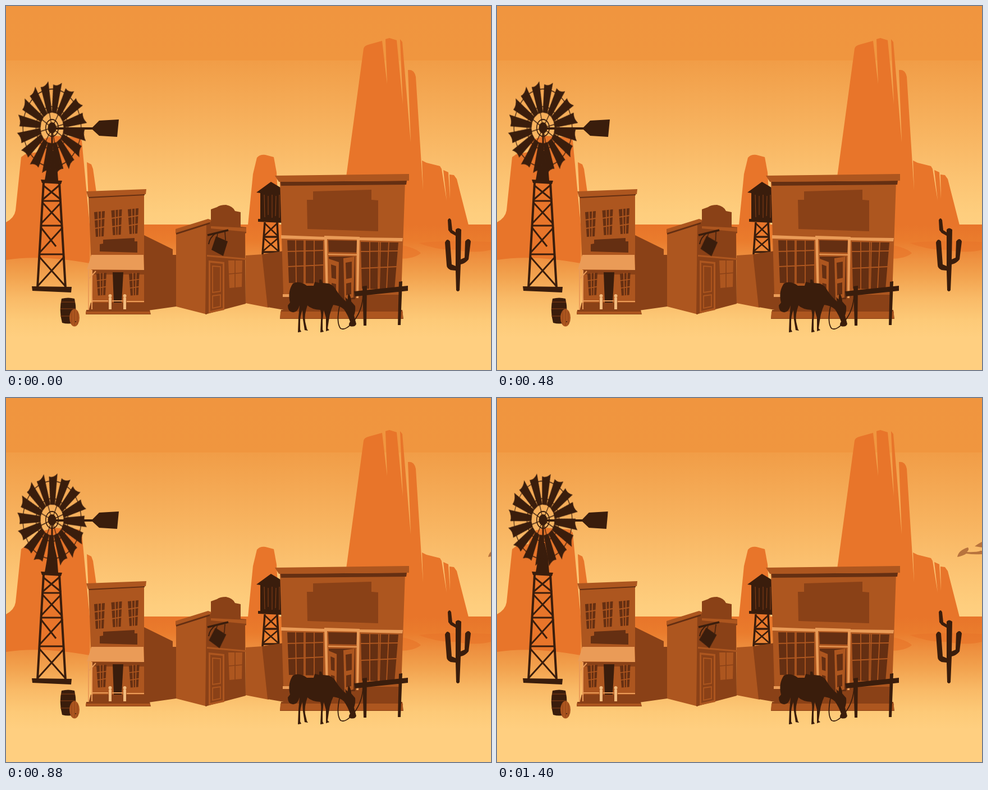
Recreate the animation shown at these times as an HTML page without scripts. Size 864 by 648 pixels, loop 1.44 s.

```html
<!DOCTYPE html>
<html lang="en">
<head>
<meta charset="utf-8">
<title>Frontier town</title>
<style>
html, body { margin: 0; width: 100%; height: 100%; overflow: hidden; background: #ffcf80; }
svg { display: block; width: 864px; height: 648px; }

.ink { fill: #3a1d0c; }
.brown { fill: #ad561f; }
.shade { fill: #8a4117; }
.deep { fill: #652f12; }
.mesa { fill: #e8752a; }
.trim { fill: #ea9b57; }
.line { fill: none; stroke: #3a1d0c; }
.bars { fill: none; stroke: #ad561f; stroke-width: 1.8; }
.rail { fill: none; stroke: #ea9b57; stroke-width: 2; }

.wheel, .vane, .sign, .bird, .door { animation: 1440ms linear infinite; }
.wheel { animation-name: spin; animation-timing-function: steps(36); }
.bird { animation-name: glide; animation-timing-function: steps(36); }
.vane { animation-name: turn; }
.sign { animation-name: swing; }
.door { animation-name: open; }

@keyframes spin { to { transform: rotate(135deg); } }
@keyframes glide { from { transform: translateX(105px); } to { transform: translateX(-3px); } }
@keyframes turn {
  0%, 62% { transform: scaleX(1); }
  72% { transform: scaleX(.996); }
  86% { transform: scaleX(.985); }
  100% { transform: scaleX(.97); }
}
@keyframes swing {
  0% { transform: rotate(0); }
  22% { transform: rotate(5deg); }
  44% { transform: rotate(8deg); }
  72% { transform: rotate(9.5deg); }
  100% { transform: rotate(12deg); }
}
@keyframes open {
  0% { transform: scaleX(1); }
  22% { transform: scaleX(.95); }
  61%, 100% { transform: scaleX(.8); }
}
</style>
</head>
<body>
<svg viewBox="0 0 864 648">
  <defs>
    <linearGradient id="sky" gradientUnits="userSpaceOnUse" x1="0" y1="0" x2="0" y2="390">
      <stop offset="0" stop-color="#f0953f"/>
      <stop offset=".25" stop-color="#f0963f"/>
      <stop offset=".25" stop-color="#f19d47"/>
      <stop offset=".55" stop-color="#f7b25e"/>
      <stop offset=".8" stop-color="#fcc473"/>
      <stop offset=".95" stop-color="#fece7e"/>
      <stop offset="1" stop-color="#fecf80"/>
    </linearGradient>
    <linearGradient id="ground" gradientUnits="userSpaceOnUse" x1="0" y1="390" x2="0" y2="590">
      <stop offset="0" stop-color="#e8752a"/>
      <stop offset=".14" stop-color="#ea7c2d"/>
      <stop offset=".3" stop-color="#ee9140"/>
      <stop offset=".45" stop-color="#f2a24e"/>
      <stop offset=".65" stop-color="#f9ba67"/>
      <stop offset=".85" stop-color="#fdca78"/>
      <stop offset="1" stop-color="#ffcf80"/>
    </linearGradient>

    <!-- Sixteen blades by repeated doubling -->
    <path id="blade" d="M-5-27L-10-77Q0-74 10-83L6-27Z"/>
    <g id="blades2"><use href="#blade"/><use href="#blade" transform="rotate(22.5)"/></g>
    <g id="blades4"><use href="#blades2"/><use href="#blades2" transform="rotate(45)"/></g>
    <g id="blades8"><use href="#blades4"/><use href="#blades4" transform="rotate(90)"/></g>

    <g id="pane">
      <path class="deep" d="M0 2L19 0L17 45L3 46Z"/>
      <path class="bars" d="M7 0L8 46M13 0L12 46M0 16L19 13M1 31L19 28"/>
    </g>
  </defs>

  <rect width="864" height="390" fill="url(#sky)"/>
  <rect y="389" width="864" height="259" fill="url(#ground)"/>

  <g class="mesa">
    <path d="M0 385Q15 377 17 364L27 269L34 264L56 260L62 238L85 231L130 234L135 240L149 388V458Q60 442 0 452Z"/>
    <path d="M144 278L152 282L155 290L161 332L163 390H149Z"/>
    <path d="M431 390L440 299L447 270Q452 264 462 265L477 269L482 296L487 390Z"/>
    <path d="M606 304L637 76Q638 71 645 69L670 62L679 139L676 59L683 57L696 61L707 175L702 59L706 64L721 243L716 114Q727 112 730 126L743 328L741 275L749 279L773 285L776 290L785 346L779 292L788 296L791 343L790 300L798 301L803 308L824 390H606Z"/>
    <path opacity=".7" d="M700 425Q730 430 739 440Q728 450 700 450ZM735 422Q790 416 864 420V434Q838 441 800 434Q765 434 735 422Z"/>
  </g>

  <!-- Bird -->
  <g class="bird" fill="#b8733d">
    <path d="M820 283Q822 271 839 266Q842 270 837 274Q851 275 864 272V278Q848 279 836 277Q830 281 820 283Z"/>
    <path d="M851 264Q859 258 872 252L964 240V266L864 266Z"/>
    <path d="M860 272L930 270L964 280L860 278Z"/>
  </g>

  <!-- Windmill -->
  <path class="ink" d="M62 309L100 311L98 317L64 315ZM46 499L117 500L116 510L47 507ZM69 310L74 281L80 258H85L91 285L93 311Z"/>
  <g class="line" stroke-width="4">
    <path d="M67 314L56 502M95 314L106 502"/>
    <path stroke-width="3" d="M65 347H98M62 391H101M59 442H104M66 319L98 345M95 319L65 345M65 350L100 388M98 350L62 388M62 394L89 428M101 394L59 440M59 446L105 498M104 446L57 498"/>
  </g>
  <g transform="translate(82 217)">
    <g class="vane ink">
      <path d="M0-1H72L84-13L119-15L116 16L84 14L72 3H0Z"/>
    </g>
    <g transform="scale(.75 1)">
      <g class="wheel">
        <g class="ink" transform="rotate(-13)">
          <use href="#blades8"/><use href="#blades8" transform="rotate(180)"/>
          <g class="line" stroke-width="1.6">
            <circle r="69"/><circle r="38"/>
            <path d="M0-38V38M-38 0H38M-27-27L27 27M27-27L-27 27"/>
          </g>
        </g>
      </g>
      <circle class="line" r="15" stroke-width="2"/>
      <circle class="ink" r="10"/>
    </g>
    <path class="line" stroke-width="3" d="M0 0V50"/>
  </g>

  <!-- Barrels -->
  <path class="ink" d="M99 521Q111 518 122 521Q127 542 122 564Q111 567 100 564Q94 543 99 521Z"/>
  <path class="line" style="stroke:#8a4117" d="M98 527H123M97 539H124M97 552H124"/>
  <ellipse class="brown" cx="122" cy="555" rx="9" ry="15.5"/>
  <path class="line" style="stroke:#8a4117" stroke-width=".8" d="M117 543V567M122 541V569M127 544V567"/>
  <circle class="ink" cx="124" cy="562" r="1"/>

  <!-- Tall house -->
  <path class="shade" d="M246 408L297 433V443H303V535L246 543Z"/>
  <path class="brown" d="M147 336L246 334V545H155Z"/>
  <path class="deep" d="M147 339L247 334V337L148 342Z"/>
  <path class="brown" d="M143 330L250 326L249 335L146 340Z"/>
  <use href="#pane" x="157" y="365"/>
  <use href="#pane" x="187.500" y="362"/>
  <use href="#pane" x="217" y="360"/>
  <path class="deep" d="M173 416L229 413V419H234V439L167 437V424L173 423Z"/>
  <path class="shade" d="M153 470H246V478H153ZM151 528H246V543H147Z"/>
  <use href="#pane" transform="translate(161 475) scale(.94 .88)"/>
  <use href="#pane" transform="translate(219 475) scale(.98 .88)"/>
  <path class="ink" d="M190 474H209L206 528H192Z"/>
  <path class="trim" d="M152 443H245L246 470L144 469Z"/>
  <path class="rail" d="M147 470V542M153 470V540M148 485L160 472M153 525H182M189 525H208M215 526H246"/>
  <path fill="#f3bb7d" d="M183 519H188V540H183ZM209 519H214V540H209Z"/>
  <g fill="#f3bb7d"><circle cx="185.500" cy="516" r="3"/><circle cx="211.500" cy="516" r="3"/></g>
  <path class="shade" d="M143 541H256L258 549H142Z"/>
  <path class="brown" d="M142 544H257V548H142Z"/>

  <!-- Water tower -->
  <path class="ink" d="M446 332L472 313L492 325V386L449 384V379H453V333Z"/>
  <path class="line" style="stroke:#8a4117" stroke-width="1" d="M460 336L461 376M467 338V372M474 336V377M481 338L480 374M487 336V377"/>
  <path class="line" stroke-width="3.500" d="M461 385L457 442M483 385L486 442M458 411H486M457 438H487"/>
  <path class="line" stroke-width="2.500" d="M461 387L485 410M483 387L459 410M459 413L486 437M485 413L457 437"/>

  <!-- Workshop and fence -->
  <path class="brown" d="M427 444L457 442L468 537L427 529Z"/>
  <path class="shade" d="M456 442L495 436V541L466 536Z"/>
  <path class="brown" d="M303 403L358 384V549L303 535Z"/>
  <path class="shade" d="M357 383L365 381V362L376 358Q381 354 392 354Q405 357 408 365L418 367V393L428 394V404L426 405L427 530L355 549Z"/>
  <path class="brown" d="M302 397L360 379L366 381L363 386L302 405Z"/>
  <path class="deep" d="M303 404L363 385V388L303 407Z"/>
  <path class="brown" d="M365 392L428 395V402L365 396Z"/>
  <path class="brown" d="M358 443L427 449V452L358 446ZM361 453L389 456V541L361 547Z"/>
  <path class="shade" d="M364 457L386 459V538L364 543Z"/>
  <path class="bars" d="M368 463L382 464V508L368 510ZM368 516L382 514V535L368 538Z"/>
  <path class="brown" d="M396 453H421L420 500L398 502Z"/>
  <path class="line" style="stroke:#8a4117" stroke-width="1.600" d="M408 453V501M397 477L421 475"/>
  <path class="line" stroke-width="3.500" d="M359 408L396 399"/>
  <path class="line" stroke-width="2" d="M361 424Q363 412 373 405"/>
  <g transform="translate(380 403)">
    <g class="sign">
      <path class="line" stroke-width="1.500" d="M-3 0L-4 9M10-2L11 14"/>
      <path class="ink" d="M-6 7L15 16L7 42L-14 31Z"/>
    </g>
  </g>

  <!-- Saloon -->
  <path class="brown" d="M488 312H711L703 544H495Z"/>
  <path class="deep" d="M489 313L714 311L713 318L490 320Z"/>
  <path class="brown" d="M479 302L718 299V311L486 313Z"/>
  <path class="shade" d="M547 330L651 327V345L663 346V401L537 397L536 345H547Z"/>
  <path class="deep" d="M501 417L565 418V494L504 493ZM632 420L699 421L692 505L634 503Z"/>
  <path class="bars" d="M516 417L517 494M531 417V494M533 417V494M549 417V494M501 437L565 435M502 464L565 461M648 420V504M664 420L663 504M667 420L665 504M682 420L678 504M632 437L698 436M633 467L696 464"/>
  <path class="shade" d="M494 514H704L703 543H494Z"/>
  <path class="trim" d="M490 408L568 411V416L490 414ZM629 412L707 413L706 419L629 417ZM493 513H508V518H493Z"/>
  <path class="trim" d="M567 409L630 411L628 520H624L625 416L572 415L574 520H570Z"/>
  <path class="deep" d="M574 417L625 418L624 439L575 438ZM575 446H622V522H577Z"/>
  <path class="rail" d="M574 442L625 443"/>
  <g transform="translate(575 0)"><g class="door">
    <path class="brown" d="M0 450L18 456L17 522L2 517Z"/>
    <path class="deep" d="M4 460L13 463V486L5 484ZM5 493L13 495V514L6 511Z"/>
  </g></g>
  <path class="brown" d="M601 449L621 446L619 519L603 522Z"/>
  <path class="deep" d="M605 457L616 455V484L606 486ZM606 494L615 492V513L606 515Z"/>
  <path class="shade" d="M490 541H706L708 557H488Z"/>
  <path class="brown" d="M489 544H707V556H488Z"/>

  <!-- Hitching post -->
  <path class="ink" d="M620 508L716 498V507L622 517ZM635 499L643 498L642 569H637ZM700 491L706 490L703 568H698Z"/>

  <!-- Horse -->
  <path class="ink" d="M511 494Q523 488 536 498L548 498L550 491L558 493V487H562L564 493L575 494Q584 497 589 507Q596 518 606 526L604 518L609 523Q608 515 611 512Q615 519 615 526L622 534Q623 543 620 551L624 566Q622 572 613 570Q609 567 613 562Q609 550 602 540Q594 533 583 532L580 539Q576 550 575 560L573 574L576 577L570 579V555L566 541L564 560V576L566 580L560 581L561 560Q562 547 560 541Q544 540 537 533Q531 550 533 562L536 575L538 578L532 577L529 558L528 541Q524 552 524 562V576L526 580L520 581L521 555L523 533Q519 547 510 545Q502 544 502 533L506 528Q501 509 511 494Z"/>
  <path class="line" stroke-width="1.800" d="M594 535Q588 564 596 574Q604 578 615 566M636 515Q635 540 621 559"/>

  <!-- Cactus -->
  <path class="ink" d="M801 398Q805 393 811 398L810 451L817 448L818 419Q824 411 828 419L824 451Q819 458 810 460L808 506Q805 510 802 506L801 471L792 470Q785 467 785 461L782 421Q786 412 791 419L794 460L801 463V409L792 404L788 399L787 381Q790 375 793 381L795 399L801 403Z"/>
</svg>
</body>
</html>
```
